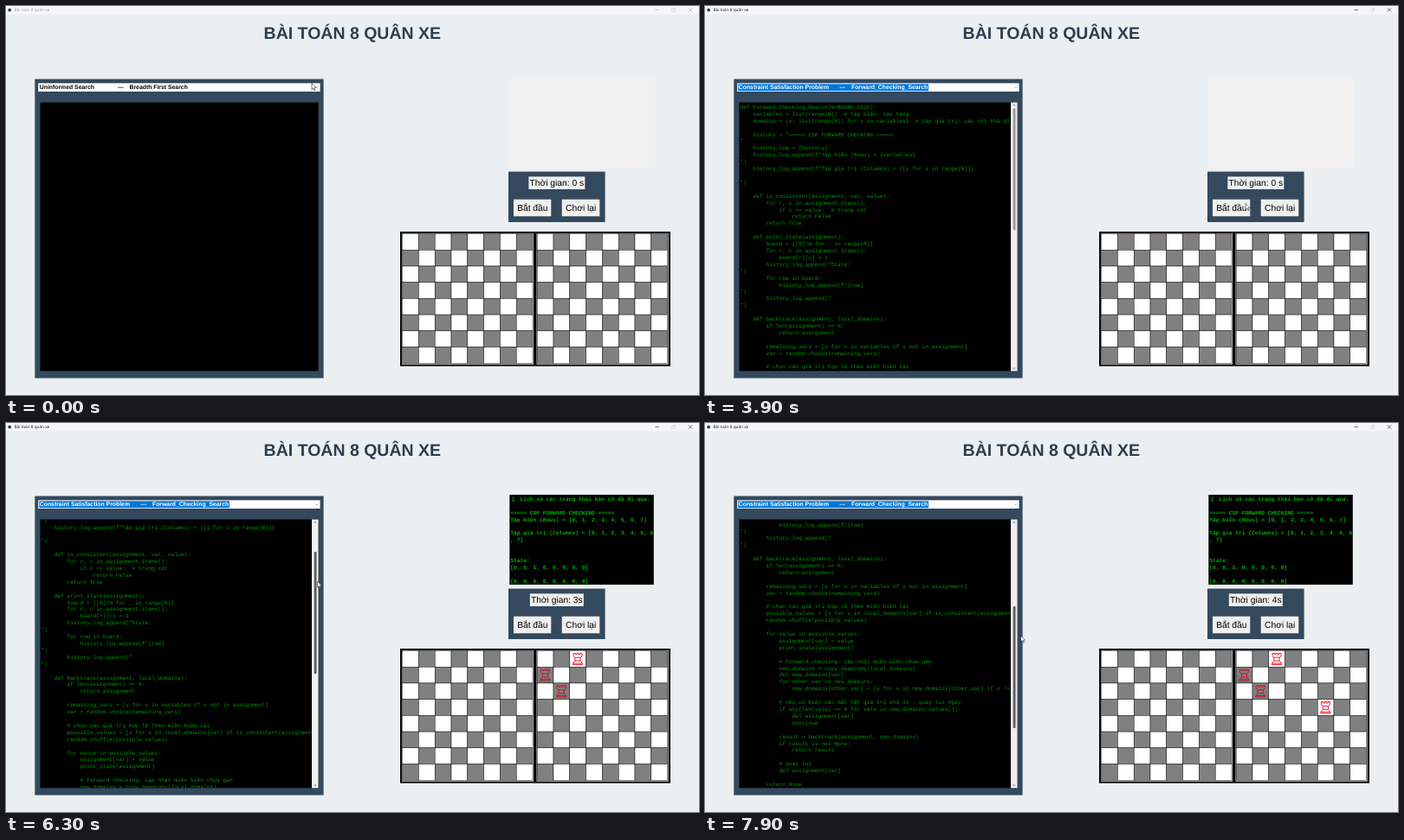
Write an HTML page that moves like this. It is 800 px wide and 450 px high and loops after 8000 ms.

```html
<!DOCTYPE html>
<html lang="vi">
<head>
<meta charset="utf-8">
<title>Bài toán 8 quân xe</title>
<style>
  html, body { margin: 0; width: 100%; height: 100%; overflow: hidden; background: #ebeff1; }
  svg { display: block; width: 100%; height: 100%; }
  text { white-space: pre; text-rendering: geometricPrecision; font-family: "Liberation Sans", Arial, sans-serif; }
  .ui { font-family: "Open Sans", "Noto Sans", sans-serif; font-size: 4.72px; }
  .mono { font-family: "Liberation Mono", "DejaVu Sans Mono", monospace; font-size: 6.25px; }
  .combo { font-size: 6.85px; font-weight: 700; }
  .label { font-size: 10.25px; text-anchor: middle; }
</style>
</head>
<body>
<svg id="stage" viewBox="0 0 800 450"></svg>
<script>
const LOOP = 8000, STEP = 100;
const OPEN = 300, PICK = 2800, START = 4100, DRAG = 5300;
const LINE = 7.908, ROW = 6.66;
const NAVY = '#34495e', FACE = '#f0f0f0', BLUE = '#0078d7';

const CODE = `def Forward_Checking_Search(N=BOARD_SIZE):
    variables = list(range(N))  # tập biến: các hàng
    domains = {v: list(range(N)) for v in variables}  # tập giá trị: các cột khả dĩ

    history = "===== CSP FORWARD CHECKING =====
"
    history_log = [history]
    history_log.append(f"Tập biến (Rows) = {variables}
")
    history_log.append(f"Tập giá trị (Columns) = {[i for i in range(N)]}

")

    def is_consistent(assignment, var, value):
        for r, c in assignment.items():
            if c == value:  # trùng cột
                return False
        return True

    def print_state(assignment):
        board = [[0]*N for _ in range(N)]
        for r, c in assignment.items():
            board[r][c] = 1
        history_log.append("State:
")
        for row in board:
            history_log.append(f"{row}
")
        history_log.append("
")

    def backtrack(assignment, local_domains):
        if len(assignment) == N:
            return assignment

        remaining_vars = [v for v in variables if v not in assignment]
        var = random.choice(remaining_vars)

        # chọn các giá trị hợp lệ theo miền hiện tại
        possible_values = [v for v in local_domains[var] if is_consistent(assignment, var, v)]
        random.shuffle(possible_values)

        for value in possible_values:
            assignment[var] = value
            print_state(assignment)

            # forward checking: cập nhật miền biến chưa gán
            new_domains = copy.deepcopy(local_domains)
            del new_domains[var]
            for other_var in new_domains:
                new_domains[other_var] = [v for v in new_domains[other_var] if v != value]

            # nếu có biến nào mất hết giá trị khả dĩ → quay lui ngay
            if any(len(vals) == 0 for vals in new_domains.values()):
                del assignment[var]
                continue

            result = backtrack(assignment, new_domains)
            if result is not None:
                return result

            # quay lui
            del assignment[var]

        return None
`.split('\n');

const LOG = `   Lịch sử các trạng thái bàn cờ đã đi qua:

===== CSP FORWARD CHECKING =====
Tập biến (Rows) = [0, 1, 2, 3, 4, 5, 6, 7]

Tập giá trị (Columns) = [0, 1, 2, 3, 4, 5, 6
, 7]


State:
[0, 0, 1, 0, 0, 0, 0, 0]

[0, 0, 0, 0, 0, 0, 0, 0]`.split('\n');

// group, x of the dashes, x of the names, names
const MENU = [
  ['Uninformed Search', 104, 113.5, 'Breadth First Search,Depth_First_Search,Uniform_Cost_Search'],
  ['Informed Search', 101, 110.5, 'Greedy_Search,A_Star_Search'],
  ['Local Search', 97.5, 107, 'Hill_Climbing,Simulated_Annealing,Genetic_Algorithm,Beam_Search'],
  ['Complex Environment Search', 108.5, 118, 'DFS_And_Or,Belief_State_Search,Partial_Observable_Search'],
  ['Constraint Satisfaction Problem', 115.5, 125, 'Backtracking Search,Forward_Checking_Search,AC3_Search'],
  ['Adversarial Search Algorithms', 112, 121.5, 'Minimax_Search,Alpha_Beta_Pruning_Search'],
].flatMap(([group, dash, x, names]) => names.split(',').map(name => ({ group, dash, x, name })));

// [time, x, y]
const POINTER = [
  [0, 353, 89.5], [400, 353, 89.5], [900, 310, 118], [1500, 250, 135], [2300, 233.5, 144], [PICK, 233.5, 144],
  [3600, 622, 230], [3900, 624, 228.5], [4200, 624, 228.5], [5000, 361, 152], [DRAG, 358.5, 152.5],
  [6300, 359.5, 183], [7200, 364.5, 220.5], [7900, 364.5, 246], [8000, 364.5, 249.5],
];
const SCROLL = [[0, 0], [DRAG, 0], [6300, 67.5], [7200, 149.5], [7900, 205], [8000, 212.5]];
const LIST_TOP = [[0, 0], [1100, 3], [1300, 6], [1500, 7]];
const ROOKS = [[0, 2], [1, 0], [2, 1], [3, 5]];

const stage = document.getElementById('stage');

function add(parent, tag, attrs = {}, text) {
  const el = document.createElementNS('http://www.w3.org/2000/svg', tag);
  for (const k in attrs) el.setAttribute(k, attrs[k]);
  if (text !== undefined) el.textContent = text;
  parent.append(el);
  return el;
}
const group = (parent, attrs) => add(parent, 'g', attrs);
const rect = (parent, x0, y0, x1, y1, fill, more) =>
  add(parent, 'rect', { x: x0, y: y0, width: x1 - x0, height: y1 - y0, fill, ...more });
const text = (parent, x, y, str, cls, fill = '#000') => add(parent, 'text', { x, y, class: cls, fill }, str);
const path = (parent, d, stroke, width, fill = 'none') =>
  add(parent, 'path', { d, stroke, 'stroke-width': width, fill });
const show = (el, on) => el.setAttribute('display', on ? 'inline' : 'none');

function clip(id, x0, y0, x1, y1) {
  rect(add(stage, 'clipPath', { id }), x0, y0, x1, y1);
  return { 'clip-path': `url(#${id})` };
}

function lerp(keys, t) {
  let i = 1;
  while (i < keys.length - 1 && t >= keys[i][0]) i++;
  const [a, b] = [keys[i - 1], keys[i]];
  const k = Math.min(1, (t - a[0]) / (b[0] - a[0]));
  return a.slice(1).map((v, j) => v + (b[j + 1] - v) * k);
}
const hold = (keys, t) => keys.filter(k => t >= k[0]).pop()[1];

// Window and title
rect(stage, 0, 0, 800, 450, '#ebeff1');
rect(stage, 0, 0, 800, 9.5, '#f5f6f7');
add(stage, 'circle', { cx: 4.2, cy: 4.7, r: 1.9, fill: '#1d4a78' });
const caption = group(stage);
text(caption, 9.5, 6.4, 'Bài toán 8 quân xe', 'ui', 'currentColor');
path(caption, 'M749.5 4.6h4.4M787.8 2.4l4.2 4.2m0-4.2l-4.2 4.2', 'currentColor', .6);
path(stage, 'M768.6 3.4h3v3h-3zM769.6 2.5h3v3', '#c4c4c4', .5);
add(stage, 'text', {
  x: 399.8, y: 37.8, 'text-anchor': 'middle', 'font-size': 19.5, 'font-weight': 700, fill: '#2c3e50',
}, 'BÀI TOÁN 8 QUÂN XE');

// Left panel
rect(stage, 33.3, 84.5, 366.6, 430.5, NAVY);
rect(stage, 37.2, 89.3, 362.6, 99, '#fff');
rect(stage, 39.5, 111.5, 360.6, 422.3, '#000');
const arrowBox = rect(stage, 355.5, 89.8, 362.2, 98.8, '#cce4f7', { stroke: BLUE, 'stroke-width': .4 });
path(stage, 'M357.6 93.5l1.3 1.3l1.3-1.3', '#444', .5);

function comboText(parent, fill, dash, x, [left, right]) {
  text(parent, 38.8, 96.3, left, 'combo', fill);
  text(parent, dash, 96.3, '---', 'combo', fill);
  text(parent, x, 96.3, right, 'combo', fill);
}
const before = group(stage), after = group(stage);
comboText(before, '#000', 129, 142.5, ['Uninformed Search', 'Breadth First Search']);
rect(after, 38.3, 90.3, 258, 98.2, BLUE);
comboText(after, '#fff', 155.3, 169, ['Constraint Satisfaction Problem', 'Forward_Checking_Search']);

// Code view with scrollbar
const codeBox = group(after, clip('codeClip', 39.5, 111.8, 353, 422));
const code = group(codeBox);
CODE.forEach((s, i) => text(code, 40.5, 118.9 + i * LINE, s, 'mono', '#009800'));
rect(after, 353, 111.5, 360.6, 422.3, FACE);
path(after, 'M355.4 115.6l1.6-2l1.6 2zM355.4 418.4l1.6 2l1.6-2z', 'none', 0, '#888');
const thumb = rect(after, 355.7, 118.3, 358.5, 259.5, '#9a9a9a', { rx: 1 });

// Drop-down list
const list = group(stage);
rect(list, 37.2, 99.2, 362.4, 167.4, '#fff', { stroke: '#222', 'stroke-width': .4 });
const rows = group(group(list, clip('listClip', 37.4, 99.6, 355.3, 167)));
const items = MENU.map((m, i) => {
  const g = group(rows), y = 99.9 + i * ROW;
  const bar = rect(g, 38, y, 354.8, y + ROW, BLUE);
  const label = group(g);
  text(label, 38.5, y + 5, m.group, 'ui', 'currentColor');
  text(label, m.dash, y + 5, '---', 'ui', 'currentColor');
  text(label, m.x, y + 5, m.name, 'ui', 'currentColor');
  return { bar, label };
});
rect(list, 355.3, 99.6, 362.2, 167.2, FACE);
path(list, 'M357.4 103.6l1.4-1.8l1.4 1.8zM357.4 163.4l1.4 1.8l1.4-1.8z', 'none', 0, '#888');
const listThumb = rect(list, 358, 106, 359.7, 139, '#8a8a8a', { rx: .8 });

// Log
rect(stage, 581, 83, 749, 188.8, FACE);
const log = group(stage, clip('logClip', 581.3, 83, 747.8, 187));
rect(log, 581, 83, 748, 187, '#000');
add(log, 'circle', { cx: 585.6, cy: 87.3, r: 1.5, fill: 'none', stroke: '#00b000', 'stroke-width': .7 });
path(log, 'M585.6 88.8v2.6m-1.2-1h2.4', '#00b000', .7);
LOG.forEach((s, i) =>
  text(log, 582.3, 89.9 + i * LINE, s, 'mono', '#00b400').setAttribute('font-weight', 700));

// Controls
rect(stage, 580, 191.6, 691.6, 250, NAVY);
const timerBox = rect(stage, 603.4, 197.4, 668.3, 212, FACE);
const timer = text(stage, 635.8, 208.3, '', 'label');
function button(x0, x1, label) {
  rect(stage, x0, 223.8, x1, 243.6, '#777');
  rect(stage, x0, 223.8, x1 - .5, 243.1, '#fff');
  rect(stage, x0 + .5, 224.3, x1 - .7, 242.9, FACE);
  text(stage, (x0 + x1) / 2, 237.3, label, 'label');
}
button(586, 629.6, 'Bắt đầu');
button(641.8, 685.6, 'Chơi lại');

// Boards
const CW = 18.8, CH = 18.72, TOP = 263.5;
rect(stage, 455, 261, 767, 416.6, '#000');
function board(x0) {
  rect(stage, x0 - .7, TOP - .7, x0 + 8 * CW + 1, TOP + 8 * CH + 1.4, '#e4e4e4');
  for (let r = 0; r < 8; r++)
    for (let c = 0; c < 8; c++)
      rect(stage, x0 + c * CW, TOP + r * CH, x0 + (c + 1) * CW, TOP + (r + 1) * CH,
        (r + c) % 2 ? '#808080' : '#fff', { stroke: '#000', 'stroke-width': .45 });
}
board(457.6);
board(613.2);

const ROOK = 'M-5 -6.2h2.3v1.5h1.6v-1.5h2.2v1.5h1.6v-1.5h2.3v3.4l-1.9 1.5v3.9l1.4 1.4v1.4h1.1v1.6h-11.2v-1.6h1.1v-1.4l1.4-1.4v-3.9l-1.9-1.5z' +
  'M-3.1 -1.3h6.2M-3.1 2.6h6.2M-4.5 5.4h9';
const rooks = ROOKS.map(([r, c]) => {
  const x = 613.2 + (c + .5) * CW - .2, y = TOP + (r + .5) * CH - .3;
  const g = group(stage, { transform: `translate(${x} ${y})` });
  path(g, ROOK, (r + c) % 2 ? '#d00a20' : '#f0102c', .95);
  return g;
});

const pointer = group(stage);
path(pointer, 'M0 0v7.1l1.7-1.5l1.2 2.6l1.1-.5l-1.2-2.5h2.2z', '#000', .5, '#fff');

function draw(t) {
  const active = t >= OPEN, open = active && t < PICK, picked = t >= PICK;
  const [px, py] = lerp(POINTER, t);
  const [scroll] = lerp(SCROLL, t);

  caption.setAttribute('color', active ? '#111' : '#9a9a9a');
  show(before, !picked);
  show(after, picked);
  show(arrowBox, open);

  show(list, open);
  const top = hold(LIST_TOP, t);
  const hover = top + Math.max(0, Math.floor((py - 99.9) / ROW));
  rows.setAttribute('transform', `translate(0 ${-top * ROW})`);
  listThumb.setAttribute('y', 106 + top * 3);
  items.forEach(({ bar, label }, i) => {
    show(bar, i === hover);
    label.setAttribute('color', i === hover ? '#fff' : '#000');
  });

  code.setAttribute('transform', `translate(0 ${-scroll})`);
  thumb.setAttribute('y', 118.3 + scroll / 2.19);
  thumb.setAttribute('fill', t > DRAG ? '#5c5c5c' : '#9a9a9a');

  // One rook and one second per step after the start
  const count = t < START ? 0 : Math.min(ROOKS.length, 1 + Math.floor((t - START) / 1000));
  rooks.forEach((g, i) => show(g, i < count));
  show(log, count > 0);
  timer.textContent = count ? `Thời gian: ${count}s` : 'Thời gian: 0 s';
  timerBox.setAttribute('x', count ? 604.8 : 603.4);
  timerBox.setAttribute('width', count ? 62 : 64.9);

  pointer.setAttribute('transform', `translate(${px} ${py})`);
}

const begin = performance.now();
function tick() {
  const t = (performance.now() - begin) % LOOP;
  draw(Math.floor(t / STEP) * STEP);
  requestAnimationFrame(tick);
}
tick();
</script>
</body>
</html>
```
